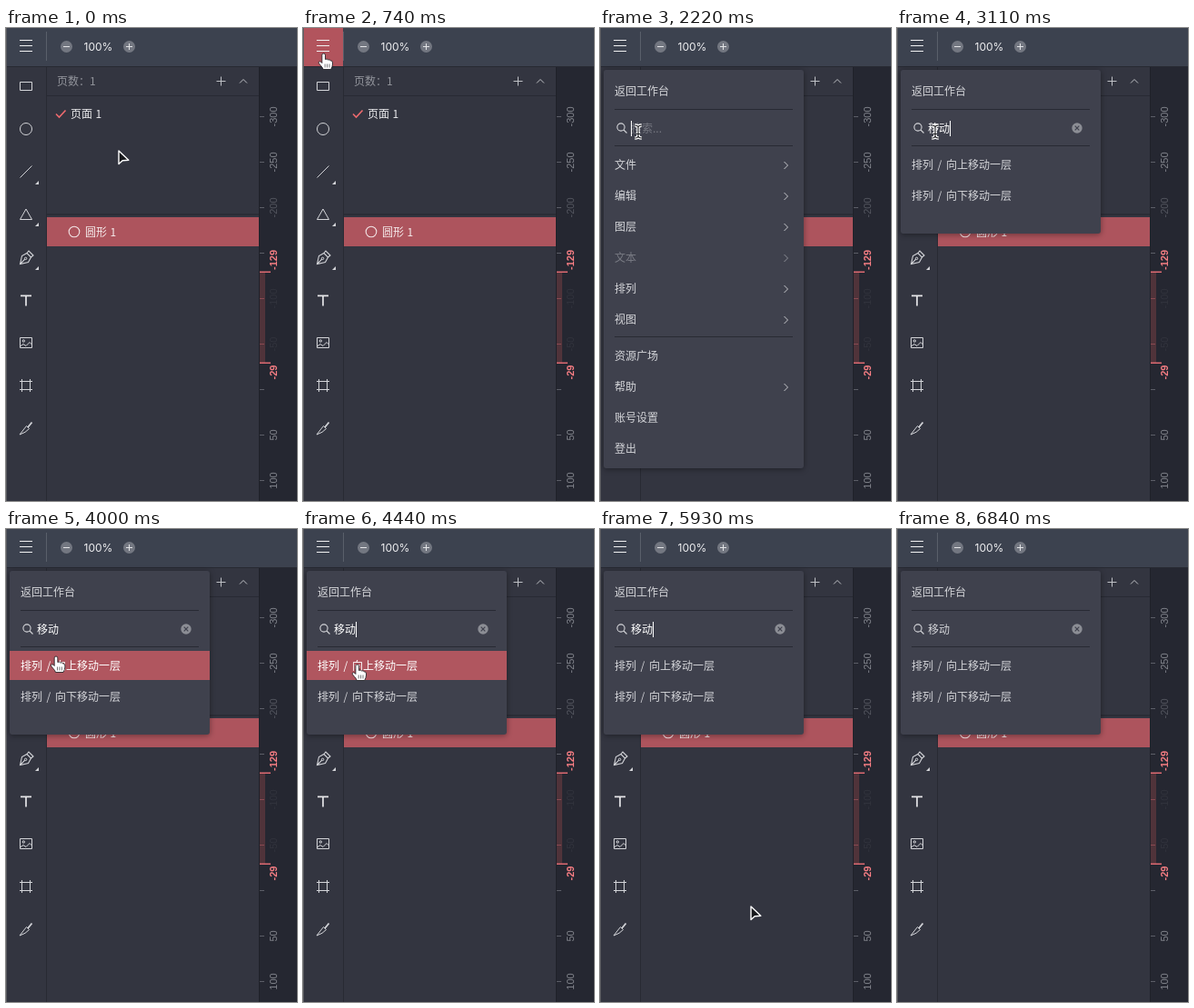
Recreate the animation shown at these times as an HTML page with a canvas. Size 320 px wide and 520 px high, loop 6.94 s.

```html
<!DOCTYPE html>
<html lang="zh-CN">
<head>
<meta charset="utf-8">
<title>菜单搜索</title>
<style>
html, body { margin: 0; width: 100%; height: 100%; overflow: hidden; background: #333540; }
canvas { display: block; width: 320px; height: 520px; }
</style>
</head>
<body>
<canvas id="stage"></canvas>
<script>
const LOOP = 6940;
const CJK = '"Noto Sans CJK SC", "Noto Sans CJK", sans-serif';
const RED = '#ad545d', LIGHT = '#d4d5d9', DARK = '#282a33';
const canvas = document.getElementById('stage');
const c = canvas.getContext('2d');
const dpr = window.devicePixelRatio || 1;
canvas.width = 320 * dpr;
canvas.height = 520 * dpr;

// time, shape, x, y
const MOVES = [
  [0, 'arrow', 123, 134], [150, 'arrow', 119, 129], [300, 'arrow', 89, 98],
  [450, 'arrow', 51, 59], [600, 'hand', 27, 34], [740, 'hand', 22.7, 28],
  [1490, 'arrow', 28, 54], [1640, 'beam', 38, 100], [1770, 'beam', 42, 113.5],
  [3700, 'beam', 43, 117], [3850, 'beam', 47, 123], [4000, 'hand', 55, 140],
  [4140, 'hand', 59, 148], [4440, 'hand', 59.7, 149], [4590, 'hand', 62, 181],
  [5040, 'hand', 96.7, 247], [5190, 'arrow', 108, 279], [5340, 'arrow', 122, 315],
  [5490, 'arrow', 136, 352], [5640, 'arrow', 150, 386], [5930, 'arrow', 165, 414],
  [6080, 'arrow', 192, 468], [6230, 'none', 0, 0]
];
const CARET = [[1340, 1640], [2220, 2820], [3110, 3850], [4440, 5040], [5640, 6230]];
const OPEN = 1340, TYPED = 3110;

function box(x, y, w, h, color) {
  c.fillStyle = color;
  c.fillRect(x, y, w, h);
}

function text(s, x, mid, color, font = '12px ' + CJK) {
  c.font = font;
  c.fillStyle = color;
  c.fillText(s, x, mid + 4.5);
}

function stroke(d, color = LIGHT, width = 1) {
  c.strokeStyle = color;
  c.lineWidth = width;
  c.stroke(new Path2D(d));
}

function fill(d, color) {
  c.fillStyle = color;
  c.fill(new Path2D(d));
}

function disc(x, y, r, color) {
  c.beginPath();
  c.arc(x, y, r, 0, 7);
  c.fillStyle = color;
  c.fill();
}

function ring(x, y, r, color = LIGHT, width = 1) {
  c.beginPath();
  c.arc(x, y, r, 0, 7);
  c.strokeStyle = color;
  c.lineWidth = width;
  c.stroke();
}

function topBar(hover) {
  box(0, 0, 320, 42, '#3c424f');
  box(0, 42, 320, 1, '#272932');
  if (hover) box(1, 0, 43, 42, '#b2545d');
  box(44, 4, 1, 32, '#5a5f6a');
  stroke('M15 13.5H29M15 19.5H29M15 25.5H29', '#f2f2f3');
  for (const x of [66.5, 135.5]) {
    disc(x, 20.5, 6.5, '#737781');
    stroke(`M${x - 3.5} 20.5h7`, '#e2e3e6');
  }
  stroke('M135.5 17v7', '#e2e3e6');
  text('100%', 85.5, 20.5, '#f0f0f2', '12px Inter, sans-serif');
}

function tools() {
  stroke('M15.5 59.5h13v9h-13z');
  ring(22, 111, 6.5);
  stroke('M15.5 164.5L28.5 151.5');
  stroke('M22 199L28.5 210.5H15.5z');
  for (const y of [172, 218, 266]) fill(`M36 ${y - 4}v4h-4z`, LIGHT);
  // pen nib
  stroke('M15.5 259.5L17.5 250.5L23 247.5L27.5 252L24.5 257.5zM15.5 259.5L20.8 254.2M23 247.5L25 245L30 250L27.5 252', LIGHT, 1.1);
  ring(21.6, 253.4, 1.2);
  stroke('M16 294.3H28M22 293.5V305.5', '#e6e6e8', 1.7);
  // image
  stroke('M15.5 340.5h13v11h-13zM15.5 350L19 347.5L22 349.5L26 345.5L28.5 348');
  ring(19.3, 344, 1.2);
  // frame
  stroke('M17.5 386V400M26.5 386V400M15 388.5H29M15 397.5H29');
  // knife
  stroke('M15 447L22.5 437.5L25.5 440.5L21 444.3z');
  stroke('M24 439L28.5 433.5', LIGHT, 1.8);
}

function panel() {
  box(0, 43, 278, 477, '#333540');
  box(44, 43, 1, 477, DARK);
  text('页数：1', 56, 58.5, '#92949b');
  stroke('M231.5 58.5h10M236.5 53.5v10M257 60.5l4-4l4 4', '#bfc1c6');
  box(45, 74, 233, 1, DARK);
  stroke('M55 94.5L58.5 98L65.5 90.5', '#ee6a6e', 1.6);
  text('页面', 71, 94, '#ececee');
  text('1', 98.5, 94, '#ececee');
  box(45, 204, 233, 2, '#2b2d36');
  box(45, 208, 233, 32, RED);
  ring(75, 224, 5.8, '#f3e6e7', 1.1);
  text('圆形', 87, 224, '#f6eced');
  text('1', 114.5, 224, '#f6eced');
}

function label(s, y, color, weight = '') {
  c.save();
  c.translate(297.5, y);
  c.rotate(-Math.PI / 2);
  c.textAlign = 'center';
  c.font = `${weight} 11px "Liberation Sans", Arial, sans-serif`;
  c.fillStyle = color;
  c.fillText(s, 0, 0);
  c.restore();
}

function ruler() {
  box(278, 43, 42, 477, '#252731');
  box(278, 43, 1, 477, '#1f2129');
  box(279, 268, 6, 100, '#50333a');
  for (let v = -300; v <= 100; v += 50) {
    const y = 397 + v;
    const gap = Math.min(Math.abs(v + 142), Math.abs(v + 19));
    const inside = v > -129 && v < -29;
    const alpha = v === -200 ? 0.45 : inside ? 0.12 : 0.9;
    box(279, y, 5, 1, inside ? '#8a4a52' : '#5c5e67');
    if (gap > 20) label(v, y + 0.5, `rgba(140,142,150,${alpha})`);
  }
  box(279, 267.5, 12, 1.5, '#dd6a72');
  box(279, 367.5, 12, 1.5, '#dd6a72');
  label('-129', 255, '#f57d83', 'bold');
  label('-29', 378.5, '#f57d83', 'bold');
}

function arrowRight(y, color = '#c6c7cb') {
  stroke(`M202.5 ${y - 3}l4 4l-4 4`, color);
}

function fullMenu() {
  const rows = ['文件', '编辑', '图层', '文本', '排列', '视图'];
  rows.forEach((s, i) => {
    const y = 150 + 34 * i, off = s === '文本';
    text(s, 16, y, off ? '#797b84' : LIGHT);
    arrowRight(y, off ? '#8d8f97' : undefined);
  });
  box(16, 339, 196, 1, DARK);
  ['资源广场', '帮助', '账号设置', '登出'].forEach((s, i) => text(s, 16, 360 + 34 * i, LIGHT));
  arrowRight(394);
}

function results(cur) {
  ['向上移动一层', '向下移动一层'].forEach((s, i) => {
    const top = 134 + 34 * i;
    const on = cur[1] === 'hand' && cur[3] >= top && cur[3] < top + 32;
    if (on) box(4, top, 220, 32, '#b0565f');
    const color = on ? '#fff' : LIGHT;
    text('排列', 16, top + 16, color);
    text('/', 44.5, top + 16, color);
    text(s, 54, top + 16, color);
  });
}

function menu(t, cur) {
  const typed = t >= TYPED;
  c.save();
  c.shadowColor = 'rgba(0,0,0,.4)';
  c.shadowBlur = 6 * dpr;
  c.shadowOffsetY = dpr;
  c.beginPath();
  c.roundRect(4, 46, 220, typed ? 180 : 438, 3);
  c.fillStyle = '#3f414d';
  c.fill();
  c.restore();

  text('返回工作台', 16, 69, LIGHT);
  box(16, 89, 196, 1, DARK);
  box(16, 129, 196, 1, DARK);
  ring(23, 109, 4.1, LIGHT, 1.1);
  stroke('M26 112L29.5 115.5', LIGHT, 1.1);
  if (typed) {
    text('移动', 34, 110.5, t < 6670 ? '#fff' : t < 6840 ? '#ebebed' : LIGHT);
    disc(198, 110, 5.7, '#8c8e95');
    stroke('M195.7 107.7l4.6 4.6M200.3 107.7l-4.6 4.6', '#3f414d', 1.2);
    results(cur);
  } else {
    text('搜索...', 34, 110.5, '#777982');
    fullMenu();
  }
  if (CARET.some(([a, b]) => t >= a && t < b)) box(typed ? 58 : 34, 102, 1, 17, '#fff');
}

function cursor([, kind, x, y]) {
  c.save();
  c.translate(x, y);
  c.lineJoin = 'round';
  if (kind === 'arrow') {
    const d = 'M1 1V15.6L5.2 11.8L11.8 11.2z';
    fill(d, '#17181c');
    stroke(d, '#fff', 1.4);
  } else if (kind === 'beam') {
    const d = 'M-3.8 -6.5Q0 -6.5 0 -4Q0 -6.5 3.8 -6.5M0 -4.5V5.5M-3.8 7.5Q0 7.5 0 5Q0 7.5 3.8 7.5M-2 3H2';
    stroke(d, '#fff', 3.4);
    stroke(d, '#17181c', 1.1);
  } else if (kind === 'hand') {
    const d = 'M-1.8 10V1.8Q-1.8 0 0 0Q1.8 0 1.8 1.8V6.5Q3.7 5.5 4.8 7Q6.6 6.2 7.4 7.8Q9.8 7.6 9.8 10V12Q9.6 14.5 8 17.5H-.5Q-1 15.5 -3 13.5L-5.3 10.8Q-6 9 -4.3 8.8Q-3 8.8 -1.8 10.5z';
    fill(d, '#fff');
    stroke(d, '#17181c', 0.8);
    stroke('M1.5 11.5v4M3.9 11.5v4M6.3 11.5v4', '#17181c', 0.6);
  }
  c.restore();
}

function draw(t) {
  const cur = MOVES.findLast(m => m[0] <= t);
  c.setTransform(dpr, 0, 0, dpr, 0, 0);
  panel();
  tools();
  ruler();
  topBar(cur[1] === 'hand' && cur[2] < 44 && cur[3] < 42);
  box(0, 0, 1, 520, '#5b5c60');
  if (t >= OPEN) menu(t, cur);
  cursor(cur);
}

const start = performance.now();
function tick() {
  draw((performance.now() - start) % LOOP);
  requestAnimationFrame(tick);
}
tick();
</script>
</body>
</html>
```
